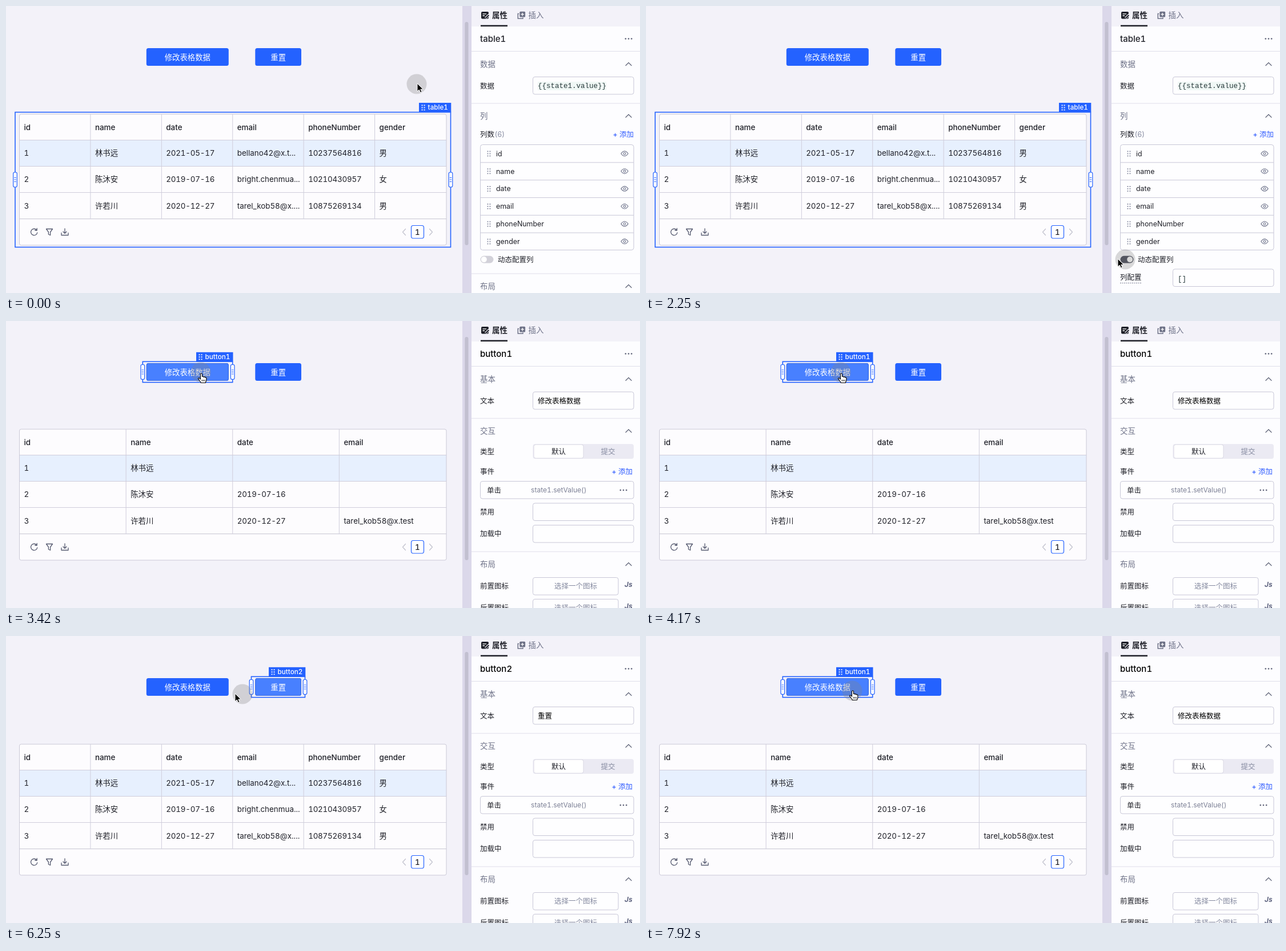
These frames come from a looping animation (1110x504 px, 8000 ms). An HTML page:

```html
<!DOCTYPE html>
<html lang="zh-CN">
<head>
<meta charset="utf-8">
<title>Table columns</title>
<style>
html, body { margin: 0; width: 100%; height: 100%; overflow: hidden; background: #f3f2f9; }
svg { display: block; width: 1110px; height: 504px; font-family: Inter, "Noto Sans CJK SC", "Noto Sans CJK", sans-serif; font-variant-numeric: tabular-nums; }
.mono { font-family: "Liberation Mono", "Courier New", monospace; }
.digits { letter-spacing: -.2px; }
</style>
</head>
<body>
<svg id="stage" viewBox="0 0 1110 504"></svg>
<script>
const INK = '#1f2028', GREY = '#6e7288', FAINT = '#858aa0', BLUE = '#2462ff', LINE = '#cfcddb', EDGE = '#c8c7d7';

// ---- drawing helpers ----
const text = (x, y, s, size = 13.4, fill = INK, more = '') =>
  `<text x="${x}" y="${y}" font-size="${size}" fill="${fill}" ${more}>${s}</text>`;
const rect = (x, y, w, h, fill, more = '') =>
  `<rect x="${x}" y="${y}" width="${w}" height="${h}" fill="${fill}" ${more}/>`;
const stroke = (d, color, width = 1, more = '') =>
  `<path d="${d}" fill="none" stroke="${color}" stroke-width="${width}" ${more}/>`;
const group = (id, body) => `<g id="${id}">${body}</g>`;
const MID = 'text-anchor="middle"', END = 'text-anchor="end"', W5 = 'font-weight="500"';
const ROUND = 'stroke-linecap="round" stroke-linejoin="round"';

const field = (y, w = 176.5, x = 922.5, h = 30.5) =>
  rect(x, y, w, h, '#fefeff', `rx="3.5" stroke="${EDGE}"`);
const rule = y => stroke(`M815 ${y}H1110`, '#dfdeea');
const chevron = y => stroke(`M1085 ${y + 2.5}l5 -5 5 5`, '#5f6378', 1.2, ROUND);
const section = (y, s) => text(830, y + 5, s, 13.4, GREY, W5) + chevron(y);
const label = (y, s, x = 830) => text(x, y + 4.7, s, 12.5);
const more = (x, y) => [0, 5.2, 10.4].map(d =>
  `<circle cx="${x + d}" cy="${y}" r="1.35" fill="#5f6378"/>`).join('');
const grip = (x, y, fill) => [0, 1, 2, 3, 4, 5].map(i =>
  rect(x + i % 2 * 4, y - 4.8 + (i >> 1) * 4, 1.9, 1.9, fill)).join('');

// ---- table ----
const people = [
  { id: 1, name: '林书远', date: '2021-05-17', email: 'bellano42@x.t...', phone: '10237564816', gender: '男' },
  { id: 2, name: '陈沐安', date: '2019-07-16', email: 'bright.chenmua...', phone: '10210430957', gender: '女' },
  { id: 3, name: '许若川', date: '2020-12-27', email: 'tarel_kob58@x....', phone: '10875269134', gender: '男' }
];
const fullRows = people.map(p => Object.values(p));
const shortRows = [
  [1, people[0].name],
  [2, people[1].name, people[1].date],
  [3, people[2].name, people[2].date, 'tarel_kob58@x.test']
];
const columns = ['id', 'name', 'date', 'email', 'phoneNumber', 'gender'];

function cells(n, rows) {
  const w = 746.5 / n;
  const cell = (x, y, s = '') => text(x, y, s, 13.4, INK, /^\d/.test(s) ? 'class="digits"' : '');
  return columns.slice(0, n).map((c, i) => {
    const x = 23.5 + i * w;
    return (i ? stroke(`M${x} 190V374`, LINE) : '') + text(x + 8, 217.5, c, 13.4, INK, W5) +
      rows.map((r, j) => cell(x + 8, 263.2 + j * 46.2, r[i])).join('');
  }).join('');
}

const tableFrame =
  rect(23.5, 190, 747.5, 230, '#fdfcfe', 'rx="3"') +
  rect(24, 235.5, 747, 46, '#e7f0fe') +
  rect(24, 282, 747, 45.5, '#f7f7fb', 'id="row2"') +
  rect(24, 328, 747, 45.5, '#f7f7fb', 'id="row3"') +
  stroke('M24 235.5H771M24 281.5H771M24 327.5H771', LINE) +
  stroke('M24 373.8H771', '#c4c2d0') +
  rect(23.5, 190, 747.5, 230, 'none', 'rx="3" stroke="#cbc9d7"') +
  stroke('M53.5 393.2A5.7 5.7 0 1 0 54.8 398M54.2 390.5V394H50.7', '#565a70', 1.3, ROUND) +
  stroke('M70.5 391.5H81.5L77.6 397V402.5L74.4 401V397Z', '#565a70', 1.3, ROUND) +
  stroke('M97 398.5V402.5H109V398.5M103 391V399M100 396.2L103 399.2 106 396.2', '#565a70', 1.3, ROUND) +
  stroke('M699.5 391.5L694.5 397 699.5 402.5M741.5 391.5L746.5 397 741.5 402.5', '#c3c3cf', 1.3, ROUND) +
  rect(709.5, 385.5, 22, 22.5, '#fff', `rx="3.5" stroke="${BLUE}" stroke-width="1.2"`) +
  text(720.3, 401.7, 1, 13.4, INK, W5 + ' ' + MID);

// ---- selection frames ----
function handle(x, y) {
  return rect(x - 3.3, y - 13, 6.6, 26, '#fff', `rx="2.5" stroke="${BLUE}" stroke-width="1.2"`) +
    stroke(`M${x - 1.7} ${y - 3.5}h3.4m-3.4 3.5h3.4m-3.4 3.5h3.4`, BLUE);
}
function frame(id, x, y, w, h, tagX) {
  const right = x + w, mid = y + h / 2;
  return group(id,
    rect(x, y, w, h, 'none', `stroke="${BLUE}" stroke-width="1.6"`) +
    rect(tagX, y - 16.5, right + .8 - tagX, 16.5, BLUE) +
    grip(tagX + 4.6, y - 8.2, '#fff') +
    text(tagX + 15.6, y - 4.3, id, 11.7, '#fff', W5) +
    group(id + 'Handles', handle(x, mid) + handle(right, mid)));
}
const button = (id, x, w, s) =>
  rect(x, 74, w, 31, BLUE, 'rx="3.5"') +
  rect(x + .5, 74.5, w - 1, 30, '#4880ff', `id="${id}Lit" rx="3" stroke="#3a6ce2"`) +
  text(x + w / 2, 94.5, s, 13.4, '#fff', MID);

// ---- side panel ----
const eye = y => stroke(`M1076.8 ${y}Q1083 ${y - 8.6} 1089.2 ${y}Q1083 ${y + 8.6} 1076.8 ${y}Z`, '#6f748c', 1.1) +
  `<circle cx="1083" cy="${y}" r="1.9" fill="none" stroke="#6f748c" stroke-width="1.1"/>`;
const listItem = (s, i) => {
  const y = 259.2 + i * 30.85;
  return (i ? stroke(`M831 ${y - 15.2}H1099`, EDGE) : '') +
    grip(842.5, y, '#8e92a6') + text(858, y + 4.5, s, 12.4) + eye(y);
};
const addLink = (x, y) => text(x, y, '+ 添加', 12.5, '#2f5bff', END + ' ' + W5);

const tablePanel =
  text(830, 63, 'table1', 15, INK, W5) + section(102, '数据') + label(140, '数据') + field(124.5) +
  rect(931, 133, 120, 15, '#f0f8f6') +
  text(931, 144, '{{state1.value}}', 12.5, '#26393a', 'class="mono"') +
  rule(171) + section(193, '列') + label(225.5, '列数') + text(855.5, 230, '(6)', 12.4, FAINT) +
  addLink(1099, 230) +
  rect(830.5, 243.5, 268.5, 185, '#fefeff', `rx="4" stroke="${EDGE}"`) +
  columns.map(listItem).join('') +
  rect(830.5, 438.8, 23, 12.6, '#d2d1d9', 'id="track" rx="6.3"') +
  '<circle id="knob" cy="445.1" r="5" fill="#fff"/>' +
  label(445.3, '动态配置列', 861) +
  group('layoutHead', rule(470) + section(492, '布局')) +
  group('config', label(476.5, '列配置') + stroke('M830 486.5H868', '#777b8e', 1, 'stroke-dasharray="2 1.5"') +
    field(462) + text(931, 482.5, '[]', 12.5, '#26393a', 'class="mono"'));

const iconPicker = y => field(y - 15, 149.5) + text(997.5, y + 4.7, '选择一个图标', 12.5, FAINT, MID) +
  text(1083, y + 1, 'Js', 12, '#5f6480', 'font-weight="700" font-style="italic"');

const buttonPanel =
  '<text id="title" x="830" y="63" font-size="15" font-weight="500"></text>' +
  section(102, '基本') + label(140, '文本') + field(124.5) +
  '<text id="caption" x="931" y="144.5" font-size="12.5"></text>' +
  rule(171) + section(193, '交互') + label(229, '类型') +
  rect(922.5, 216, 176.5, 26, '#ebeaf3', 'rx="4"') +
  rect(924, 217, 87, 24, '#fff', 'rx="3.5" stroke="#d9d8e3"') +
  text(967.5, 233.7, '默认', 12.5, INK, MID + ' ' + W5) + text(1054, 233.7, '提交', 12.5, FAINT, MID) +
  label(264, '事件') + addLink(1097, 268.7) +
  field(281.5, 268.5, 830.5) + label(296.8, '单击', 842) +
  text(919, 301.3, 'state1.setValue()', 12.1, '#7d8196') + more(1075.8, 297) +
  label(335, '禁用') + field(320) + label(373.5, '加载中') + field(358.5) +
  rule(405) + section(427, '布局') +
  label(465, '前置图标') + iconPicker(465.5) + label(503.5, '后置图标') + iconPicker(503.5);

const panelBase =
  rect(799, 0, 16, 504, '#dbd8ea') + rect(803.3, 28, 6.2, 392, '#c2c0d0', 'rx="3"') +
  rect(815, 0, 295, 504, '#fdfdff') + rect(815, 0, 295, 36, '#f3f2f9') +
  rect(832, 10, 13, 12.5, INK, 'rx="2"') +
  stroke('M834.5 13.8H841M834.5 17H838', '#fff', 1.3) +
  stroke('M839.5 21.5L846 15', '#f3f2f9', 4) + stroke('M839.8 21.5L845.3 16', INK, 2.2) +
  text(851, 21.3, '属性', 13.4, INK, 'font-weight="700"') + rect(831, 33.5, 47, 2.5, INK) +
  stroke('M898 13.5H896.3V22H905V20.3', '#6d7186', 1.5) +
  rect(899.3, 9.8, 9.8, 9.8, '#6d7186', 'rx="1.5"') + stroke('M904.2 12V17.4M901.5 14.7H906.9', '#fff', 1.3) +
  text(914.5, 21.3, '插入', 13.4, GREY) +
  more(1084.8, 57.5) + rule(79.5);

const pointer =
  '<circle id="halo" r="17.5" fill="#808080" fill-opacity=".3"/>' +
  group('arrow', '<path d="M0 0V14L3.3 11 5.6 16 8 15 5.8 10.2H10.3Z" fill="#000" stroke="#fff"/>') +
  group('hand', '<path d="M-1.6 1.4C-1.6-.4 1.4-.4 1.4 1.4V6C1.6 5 4 5 4.1 6.4 4.6 5.6 6.5 5.8 6.6 7.2 7.3 6.6 8.8 6.9 8.8 8.4V12C8.8 13.5 7.4 14.5 7.4 16.5H-.8C-.8 14.5-4.6 11.5-5.4 9.3-5.8 7.9-3.8 7.5-2.8 8.8L-1.6 10Z" fill="#fff" stroke="#000" stroke-width="1.1"/>' +
    stroke('M1.2 11V14M3.6 11V14M6 11V14', '#000', .9));

document.getElementById('stage').innerHTML =
  rect(0, 0, 1110, 504, '#f3f2f9') + tableFrame +
  group('full', cells(6, fullRows)) + group('short', cells(4, shortRows)) +
  button('b1', 245.8, 144, '修改表格数据') + button('b2', 436.3, 80.7, '重置') +
  frame('table1', 16, 186.5, 762.5, 237, 723) +
  frame('button1', 239.3, 71.3, 157.4, 36.4, 333) +
  frame('button2', 429.5, 71.3, 94, 36.4, 460) +
  panelBase + group('tablePanel', tablePanel) + group('buttonPanel', buttonPanel) + pointer;

// ---- motion ----
const LOOP = 8000, STEP = 1000 / 12;
// time, pointer tip x and y, halo offset x and y
const path = [
  [0, 720, 136, -1, 1], [417, 720, 136, -1, 1], [667, 775, 104, -5, 2], [917, 850, 250, -2, -8],
  [1167, 838, 445, 2, 0], [2167, 836, 445, 4, 0], [2250, 826, 444, 13, 1], [2500, 338, 100, 8, 2],
  [2667, 338, 97, 0, 4], [3000, 340, 94, -4, 8], [3333, 342, 92, -1, -2], [4250, 342, 92, -1, -2],
  [4667, 468, 99, -5, 2], [4750, 471, 100, 0, 2], [6083, 471, 100, 0, 2], [6250, 401, 101, 13, 1],
  [6583, 362, 96, -1, 0], [LOOP, 362, 96, -1, 0]
];
const $ = id => document.getElementById(id);
const show = (id, on) => $(id).style.display = on ? '' : 'none';
const move = (id, x, y) => $(id).setAttribute('transform', `translate(${x} ${y})`);
const ramp = (t, start, span = 250) => Math.min(1, Math.max(0, (t - start) / span));
const between = (t, a, b) => t >= a && t < b;

function pointerAt(t) {
  const i = Math.max(1, path.findIndex(k => k[0] >= t));
  const a = path[i - 1], b = path[i], f = ramp(t, a[0], b[0] - a[0]);
  return a.map((v, j) => v + (b[j] - v) * f).slice(1);
}

function draw(t) {
  const selected = t < 3330 ? 'table1' : between(t, 5160, 7330) ? 'button2' : 'button1';
  const hovered = between(t, 3080, 3330) || between(t, 6410, 7330) ? 'button1'
    : between(t, 4660, 5160) ? 'button2' : '';
  for (const id of ['table1', 'button1', 'button2']) {
    show(id, id === selected || id === hovered);
    show(id + 'Handles', id === selected);
  }
  $('b1Lit').style.opacity = ramp(t, 3083) - ramp(t, 5250) + ramp(t, 6333);
  $('b2Lit').style.opacity = ramp(t, 4583) - ramp(t, 7333);

  const short = between(t, 3410, 5240) || t >= 7410;
  show('short', short);
  show('full', !short);

  show('tablePanel', selected === 'table1');
  show('buttonPanel', selected !== 'table1');
  $('title').textContent = selected;
  $('caption').textContent = selected === 'button2' ? '重置' : '修改表格数据';

  const on = ramp(t, 1583, 167), config = t >= 1740;
  $('track').setAttribute('fill', on >= .5 ? '#3f4250' : '#d2d1d9');
  $('knob').setAttribute('cx', 836.8 + 10.4 * on);
  show('config', config);
  show('layoutHead', !config);

  const [x, y, dx, dy] = pointerAt(t);
  const within = (l, r, top, bottom) => between(x, l, r) && between(y, top, bottom);
  const hand = within(246, 390, 74, 105) || within(436, 517, 74, 105) || within(831, 853, 438, 452);
  show('hand', hand);
  show('arrow', !hand);
  show('row2', within(24, 771, 282, 328));
  show('row3', within(24, 771, 328, 374));
  move('halo', x + dx, y + dy);
  move('arrow', x, y);
  move('hand', x, y);
}

const begin = performance.now();
function tick(now) {
  const t = Math.max(0, now - begin) % LOOP;
  draw(Math.floor((t + 4) / STEP) * STEP);
  requestAnimationFrame(tick);
}
draw(0);
requestAnimationFrame(tick);
</script>
</body>
</html>
```
